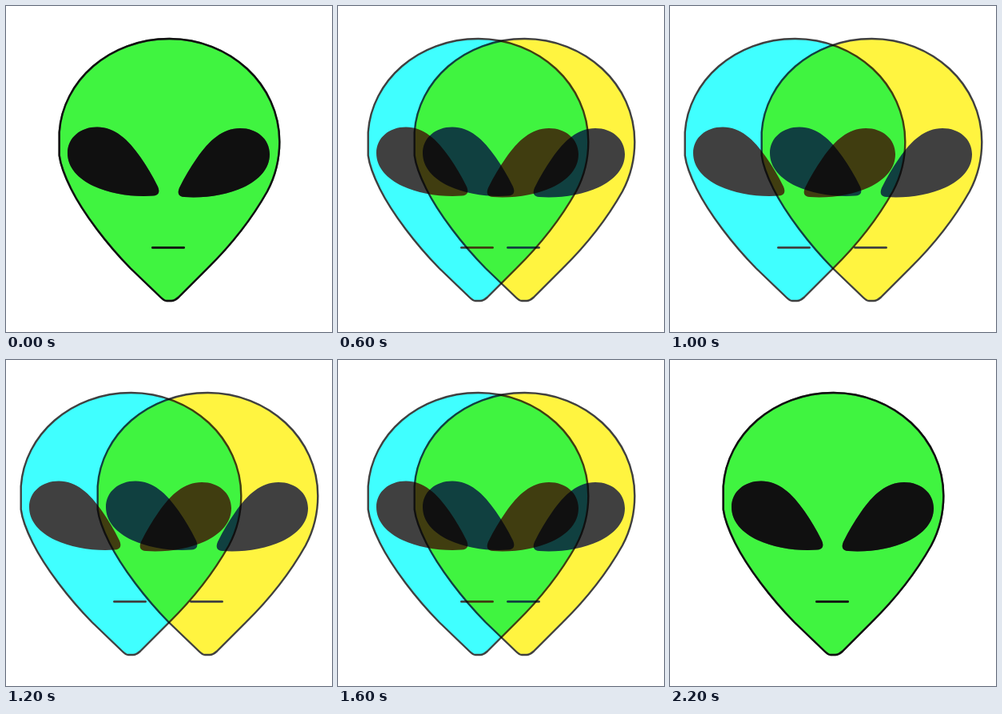
An HTML page for the animation above (2300 ms loop, 408x408 px).

```html
<!DOCTYPE html>
<html>
<head>
<meta charset="utf-8">
<style>
html, body { margin: 0; width: 100%; height: 100%; overflow: hidden; background: #fff; }
svg { display: block; width: 100vw; height: 100vh; background: #fff; isolation: isolate; }
.alien { mix-blend-mode: multiply; }
</style>
</head>
<body>
<svg viewBox="0 0 408 408">
  <defs>
    <path id="eye" fill="#404040" d="M77 184C77 165 93 151.500 114 151.500C136 151.500 152.500 166.500 168.500 189.500C176 200 183 212 190 226C193 233 191 237 184 237.500C160 239.500 130 235 110 225.500C90 216 77 202 77 184Z"/>
    <g id="alien" stroke-linecap="round">
      <path fill="currentColor" stroke="#404040" stroke-width="2.400" d="M66.700 158C71 94 129 41 204.500 41C280 41 342.300 98 342.300 170C342.300 194 336 215 327 232C309 264 283 298 252 328.500L216 364.500Q211 369 207 369H201Q198 369 193.500 364.500L155.500 328C127 299 97 260 81.500 229C75 216 68.500 201 66.700 187Z"/>
      <use href="#eye"/>
      <use href="#eye" transform="translate(407 1.500) scale(-1 1)"/>
      <path stroke="#404040" stroke-width="2.900" d="M183.500 302.400H222.500"/>
    </g>
  </defs>
  <g class="alien" id="left" color="#40ffff"><use href="#alien"/></g>
  <g class="alien" id="right" color="#fff440"><use href="#alien"/></g>
</svg>
<script>
const left = document.getElementById('left');
const right = document.getElementById('right');
const STEP = 100, COUNT = 23, SPEED = 4.8;
const start = performance.now();

// The two heads drift apart at constant speed, then back together.
function draw() {
  const k = Math.floor((performance.now() - start) / STEP) % COUNT;
  const shift = Math.round(SPEED * Math.min(k, COUNT - 1 - k));
  left.setAttribute('transform', `translate(${-shift} 0)`);
  right.setAttribute('transform', `translate(${shift} 0)`);
  requestAnimationFrame(draw);
}
draw();
</script>
</body>
</html>
```
